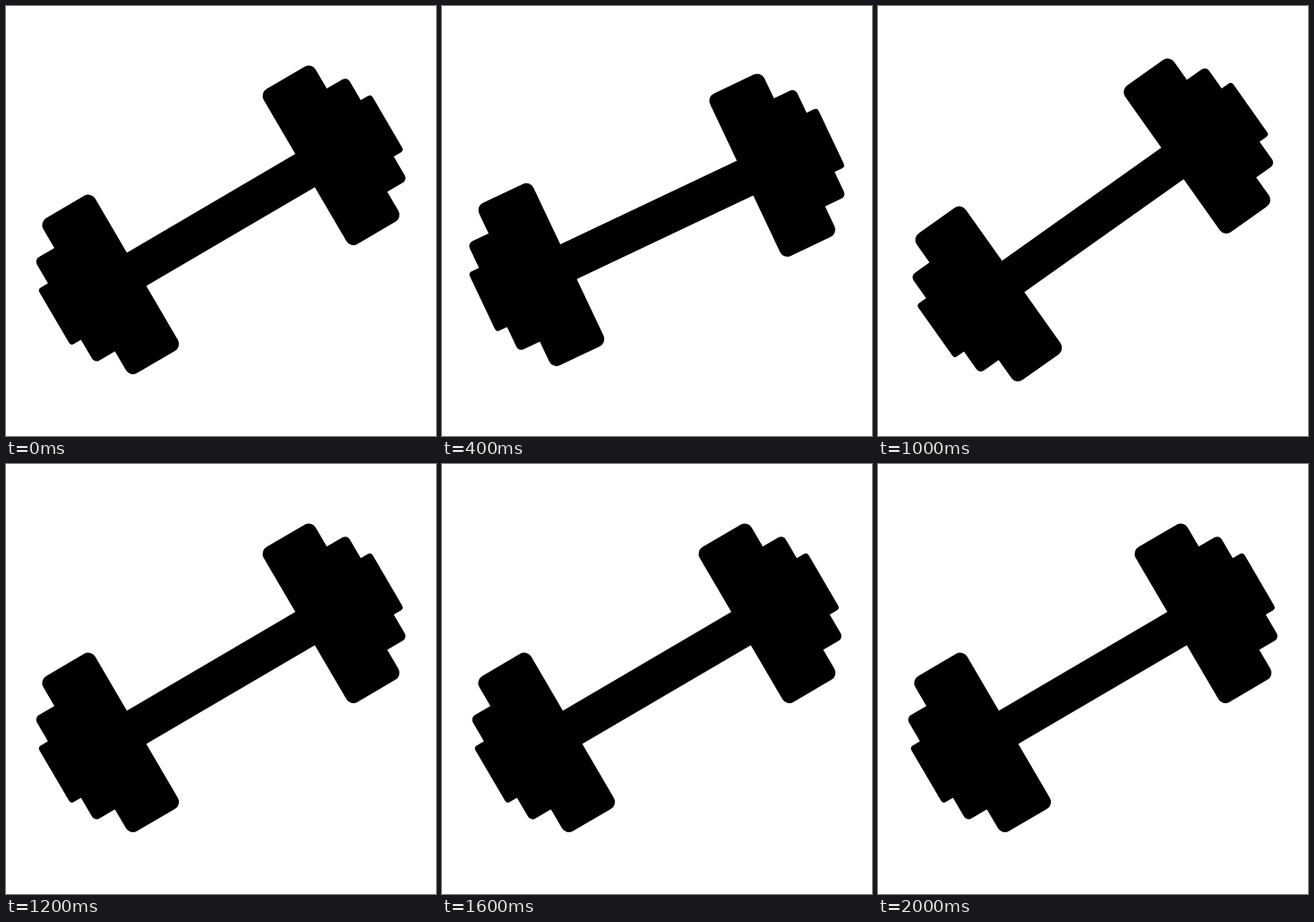
An HTML page that plays this animation: 480 px wide and 480 px high, repeating every 2100 ms.

```html
<!DOCTYPE html>
<html>
<head>
<meta charset="utf-8">
<style>
  html, body { margin: 0; width: 100%; height: 100%; overflow: hidden; background: #fff; }
  svg { display: block; width: 100%; height: 100%; }
</style>
</head>
<body>
<svg viewBox="0 0 480 480">
  <g transform="translate(239.8 238.8)">
    <g id="dumbbell">
      <rect x="-120" y="-21.5" width="240" height="43"/>
      <g id="weights">
        <rect x="109" y="-100.3" width="67.2" height="200.6" rx="9"/>
        <rect x="150" y="-66.8" width="52.3" height="133.6" rx="6"/>
        <rect x="180" y="-36.5" width="35.5" height="73" rx="4"/>
      </g>
      <use href="#weights" transform="rotate(180)"/>
    </g>
  </g>
</svg>
<script>
  const STEP = 100, LOOP = 2100, TILT = -30.35;
  const swing = [0, -5, 0, 5];
  const dumbbell = document.getElementById('dumbbell');

  // Shakes one pose per step, resting one extra step halfway through.
  function angle(step) {
    if (step === 0) return TILT;
    const pose = step > 10 ? step - 2 : step - 1;
    return TILT + swing[pose % 4];
  }

  function draw() {
    const step = Math.floor(performance.now() % LOOP / STEP);
    dumbbell.setAttribute('transform', `rotate(${angle(step)})`);
    requestAnimationFrame(draw);
  }
  draw();
</script>
</body>
</html>
```
